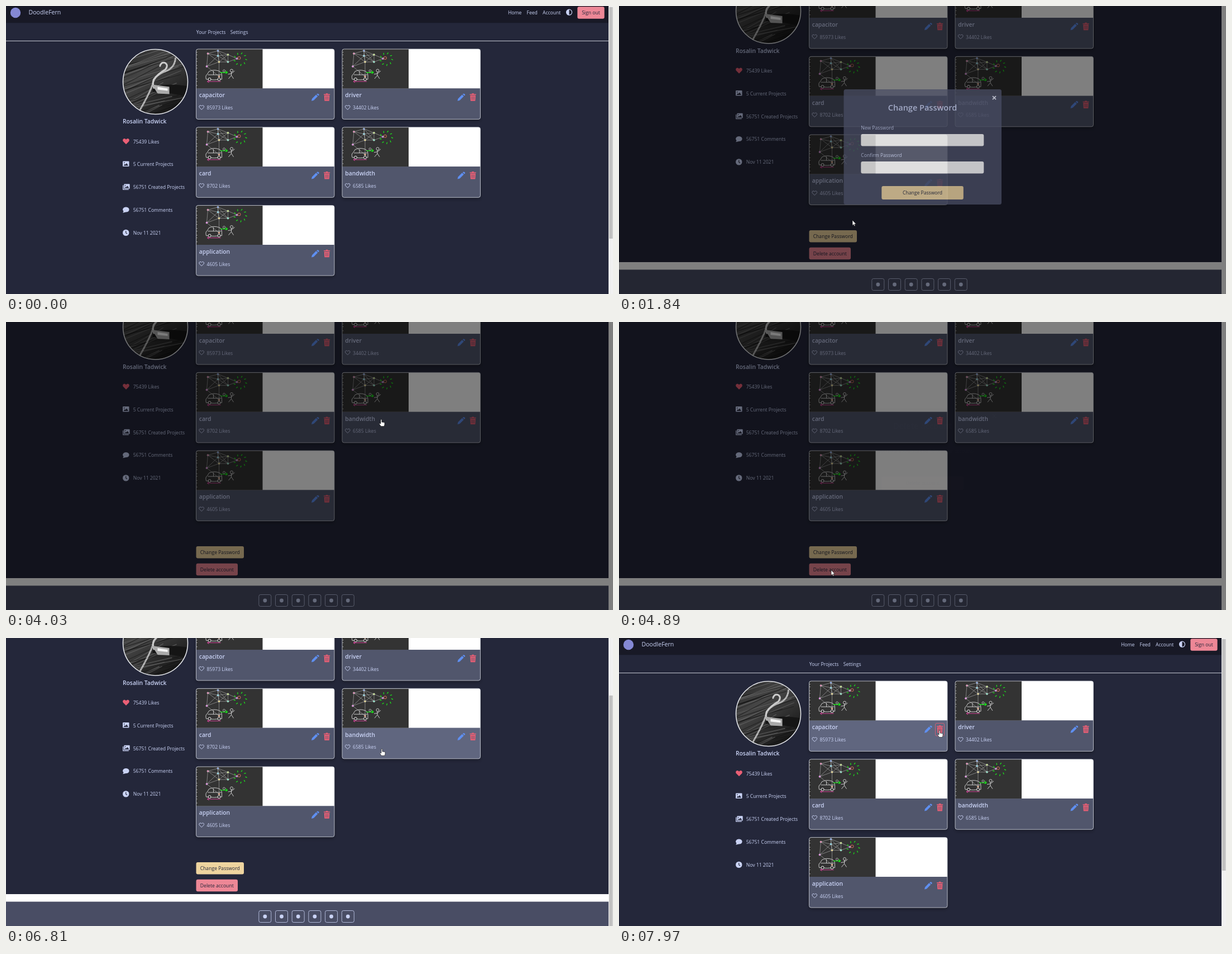
These frames come from a looping animation (1087x515 px, 8000 ms). An HTML page:

```html
<!DOCTYPE html>
<html lang="en">
<head>
<meta charset="utf-8">
<title>Account page</title>
<style>
html, body { margin: 0; width: 100%; height: 100%; overflow: hidden; background: #fff }
svg { display: block }
text { font: 8.6px "Open Sans", "Noto Sans", sans-serif; fill: #cad3f5; white-space: pre }
.bold { font-weight: 600; font-size: 10.3px }
.brand { font-size: 10.6px }
.title { font-weight: 600; font-size: 14.5px }
.mid { text-anchor: middle }
.dark { fill: #24273a }
</style>
</head>
<body>
<svg id="stage" width="1087" height="515" viewBox="0 0 1087 515"></svg>
<script>
const INK = '#cad3f5', RED = '#ed8796', YELLOW = '#eed49f', PANEL = '#494d64', HOT = '#ea5f75';
const BASE = '#24273a', CARD = '#51566c', CARD_HOVER = '#61667f';
const CARD_W = 247.5, CARD_H = 125.5, IMAGE_H = 70.5;
const stage = document.getElementById('stage');

const rect = (x, y, w, h, fill, more = '') =>
  `<rect x="${x}" y="${y}" width="${w}" height="${h}" fill="${fill}" ${more}/>`;
const text = (x, y, s, cls = '') => `<text x="${x}" y="${y}" class="${cls}">${s}</text>`;
const circle = (x, y, r, fill, more = '') => `<circle cx="${x}" cy="${y}" r="${r}" fill="${fill}" ${more}/>`;
const path = (d, fill = 'none', more = '') => `<path d="${d}" fill="${fill}" ${more}/>`;
const line = (d, color, w, more = '') => path(d, 'none', `stroke="${color}" stroke-width="${w}" ${more}`);
const at = (x, y, inner) => `<g transform="translate(${x} ${y})">${inner}</g>`;
const button = (x, y, w, h, fill, label) =>
  rect(x, y, w, h, fill, 'rx="3"') + text(x + w / 2, y + h / 2 + 3.2, label, 'mid dark');
const repeat = (n, f) => Array.from({ length: n }, (_, i) => f(i)).join('');

let seed = 7;
const random = () => (seed = seed * 16807 % 2147483647) / 2147483647;

const HEART = 'M6 10.6 1 5.6C-.8 3.4.6.3 3 .3Q5 .3 6 2 7 .3 9 .3C11.4.3 12.8 3.4 11 5.6Z';
const FRAME = 'M1 0h9.5q1 0 1 1v7.5q0 1-1 1H1q-1 0-1-1V1q0-1 1-1zM1.5 8h8.5L7 3.5 5 6.3 3.8 5zM2 2v1.5h1.5V2z';

// Hand-drawn project picture: a network, a sun, a van and a figure
function sketch() {
  const nodes = [[39, 3], [21, 8], [57, 10], [39, 12], [19, 31], [41, 23], [57, 23], [73, 17], [41, 49]];
  let web = '';
  nodes.forEach((a, i) => nodes.slice(i + 1).forEach(b => {
    if (Math.hypot(a[0] - b[0], a[1] - b[1]) < 30) web += `M${a}L${b}`;
  }));
  const sun = repeat(9, i => `<path d="M9 0l3 1.5" transform="translate(79 18) rotate(${i * 40})" stroke="#1be51b" stroke-width="1.3"/>`);
  return rect(0, 0, 119, 71, '#333') + line(web, '#ccc', .5) +
    line('M1.5 5V68', '#bbb', 1.2, 'stroke-dasharray="1.2 3.5 1.2 6"') +
    nodes.map(([x, y], i) => circle(x, y, 1.5, `hsl(${220 + i * 110} 70% 68%)`, 'stroke="#eee" stroke-width=".5"')).join('') +
    circle(77, 16, 2.5, 'none', 'stroke="#e0705a"') + sun +
    line('M18 54q-2-7 2-9l3-5q8-4 17-1 6 2 6 8v7q-14 2-28 0zM21 46h24M31 39v7', '#eee', .8) +
    circle(24, 54, 2.5, '#333', 'stroke="#eee"') + circle(41, 54, 2.5, '#333', 'stroke="#eee"') +
    line('M44 58H20m3-2-3 2 3 2', '#d6439a', 1) +
    line('M43 42h13m-3-3 3 3-3 2', '#1be51b', 1.3) +
    circle(50, 39, 2, '#333', 'stroke="#ddd" stroke-width=".7"') +
    line('M63 41v6l-5 6m5-6 4 6M57 45l6-1 6-5', '#eee', .8) +
    circle(63.5, 38.5, 2.5, '#333', 'stroke="#eee" stroke-width=".8"');
}

const pencil = path('M0 13.5 1 9.5 8.3 2.2 11.3 5.2 4 12.5ZM9.2 1.3Q11.3-.6 13.2 1.4 14.6 3 12.2 4.3Z', '#5f8ff0');
const trash = path('M0 1.5H3.5L4 .2H7.2L7.7 1.5H11.2V3H0ZM.8 3.8H10.4L9.8 13.7H1.4Z', HOT) +
  line('M3.5 5.5v6.3m2.2-6.3v6.3m2.2-6.3v6.3', CARD, .7);

const cards = [
  ['capacitor', 85973], ['driver', 34402], ['card', 8702], ['bandwidth', 6585], ['application', 4605]
].map(([name, likes], i) => ({ name, likes, x: 340.5 + i % 2 * 261.5, y: 77 + (i >> 1) * 139.8 }));

const drawCard = c => at(c.x, c.y,
  rect(0, 0, CARD_W, CARD_H, CARD, 'rx="3.5" class="body" filter="url(#shadow)"') +
  `<g clip-path="url(#cut)">${rect(0, 0, CARD_W, IMAGE_H, '#fff')}<use href="#sketch"/></g>` +
  rect(0, 0, CARD_W, CARD_H, 'none', 'rx="3.5" stroke="#d5d8e0" stroke-width=".8"') +
  text(5.3, 86.3, c.name, 'bold') +
  at(5.3, 100.5, path(HEART, 'none', `stroke="${INK}" stroke-width="1.3" transform="scale(.74)"`)) +
  text(19, 108, c.likes + ' Likes') +
  at(206.5, 79.3, pencil) + at(228.5, 79, trash));

const photo = at(267.5, 135.5,
  circle(0, 0, 58, 'url(#wood)') + '<g clip-path="url(#round)">' +
  repeat(40, () => line(`M-60 ${random() * 150 - 60}l${60 + random() * 60}-${20 + random() * 25}`,
    random() < .5 ? '#777' : '#111', 1 + random(), 'opacity=".5"')) +
  path('M-5 8Q25 2 60 8V28Q25 18-5 18Z', '#151515') +
  line('M36-43Q35-24 16-18-3-10-5 5-12 24-32 58', '#e2e2e2', 3, 'stroke-dasharray="1.6 .7"') +
  line('M8-27Q10-36 17-34 24-30 18-22 4-14-3-4-6 4-2 12', '#ccc', 3) +
  path('M-6 5 25 9V22L4 21Z', '#aaa') + path('M4 9 22 12V16L4 14Z', '#f5f5f5') +
  '</g>' + circle(0, 0, 58, 'none', 'stroke="#e4e6ea" stroke-width="1.6"'));

const picture = path(FRAME, INK, 'fill-rule="evenodd"');
const stats = [
  ['75439 Likes', path(HEART, HOT)],
  ['5 Current Projects', picture],
  [' 56751 Created Projects'.trim(), at(2.3, 0, `<g transform="scale(.9)">${picture}</g>`) + line('M.7 2.3v7.5h10', INK, 1.3)],
  ['56751 Comments', path('M6 .3C13.5.3 13.5 9.5 6 9.5L.2 10.6 1.5 7.8C-1.5 5 .5.3 6 .3Z', INK)],
  ['Nov 11 2021', circle(5.7, 5.5, 5.7, INK) + line('M5.7 2v3.8l2.3 1.6', BASE, 1.1)]
].map(([label, icon], i) => at(209, 236.7 + i * 40.8, icon + text(18.7, 8.8, label))).join('');

const social = repeat(6, i => at(452.8 + i * 29.7, 614,
  rect(0, 0, 22, 21, 'none', `rx="3" stroke="${INK}" stroke-width=".8"`) + circle(11, 10.5, 3.4, INK)));

const page =
  rect(0, 0, 1079, 584.5, BASE) + rect(0, 0, 1079, 30.3, '#181926') +
  circle(17, 12, 9.2, '#8488d4') + text(40.5, 14.8, 'DoodleFern', 'brand') +
  text(899, 15.3, 'Home') + text(932.5, 15.3, 'Feed') + text(961, 15.3, 'Account') +
  circle(1008.5, 11.2, 5, 'none', `stroke="${INK}" stroke-width="1.2"`) +
  path('M1008.5 6.2a5 5 0 0 0 0 10z', INK) +
  button(1023.3, 1.2, 48.3, 21.5, RED, 'Sign out') +
  text(340.8, 50, 'Your Projects') + text(401.8, 50, 'Settings') +
  rect(0, 62, 1079, 1, '#c4c7d2') +
  photo + text(209, 210.2, 'Rosalin Tadwick', 'bold') + stats +
  cards.map(drawCard).join('') +
  rect(566.5, 152.5, 16, 22.5, 'none', `id="ring" rx="2.5" stroke="${HOT}" stroke-width=".8"`) +
  button(340.5, 527.5, 85.5, 21.5, YELLOW, 'Change Password') +
  button(340.5, 558.3, 74.5, 21.5, RED, 'Delete account') +
  rect(0, 598, 1079, 45, PANEL) + social;

const field = (y, label) => text(433.3, y - 8, label) + rect(433.3, y, 220, 21.5, '#fff', 'rx="3"');

// Dialogs are centred on y = 259, with the action button at the foot
const dialog = (id, h, title, color, action, inner) => `<g id="${id}">` + at(402.5, 259 - h / 2,
  rect(0, 0, 282.5, h, PANEL, 'rx="3.5"') +
  line('M266.5 12l6 6m0-6-6 6', '#e8ebf8', 1.7) +
  text(141, 38.3, title, 'title mid') +
  button(67.8, h - 33, 146.5, 24, color, action)) + inner + '</g>';

stage.innerHTML = `<defs>
  <filter id="shadow" x="-5%" y="-5%" width="110%" height="120%"><feDropShadow dx="0" dy="3" stdDeviation="3" flood-opacity=".3"/></filter>
  <clipPath id="cut"><path d="M0 ${IMAGE_H}V3.5Q0 0 3.5 0H244Q247.5 0 247.5 3.5V${IMAGE_H}z"/></clipPath>
  <clipPath id="round"><circle r="58"/></clipPath>
  <linearGradient id="wood" x2=".7" y2="1"><stop stop-color="#222"/><stop offset=".4" stop-color="#474747"/><stop offset="1" stop-color="#161616"/></linearGradient>
  <g id="sketch">${sketch()}</g></defs>
  <g id="page">${page}</g>
  <g id="bar">${rect(1079, 0, 8, 515, '#f1f1f1')}${rect(1080, 2, 6.5, 414, '#c1c1c1', 'id="thumb"')}</g>
  ${rect(0, 0, 1087, 515, '#000', 'id="shade"')}` +
  dialog('change', 206, 'Change Password', YELLOW, 'Change Password',
    field(236, 'New Password') + field(284.8, 'Confirm Password')) +
  dialog('remove', 156, 'Delete account', RED, 'Delete account',
    text(543.5, 262, 'Are you sure you want to delete your account?', 'mid')) +
  `<g id="cursor" stroke="#111" stroke-width=".6" fill="#fff">
  <path id="arrow" d="M0 0V9.5L2.1 7.6 3.5 10.7 5 10 3.6 7H6.5Z"/>
  <path id="hand" d="M-1 .8Q0-.8 1 .8V5L4.8 5.5Q6 5.5 6 6.5V9.5L5 12.5H-.5L-3.5 8.3Q-3.5 6.5-1 8Z"/></g>`;

const $ = id => document.getElementById(id);
const bodies = document.querySelectorAll('.body');
const show = (id, on) => $(id).setAttribute('visibility', on ? 'visible' : 'hidden');
const move = (id, x, y) => $(id).setAttribute('transform', `translate(${x} ${y})`);
const ramp = (t, start, length) => Math.min(1, Math.max(0, (t - start) / length));
const easeOut = p => 1 - (1 - p) ** 2;
const smooth = p => p * p * (3 - 2 * p);

// Pointer moves: start, duration, destination
const moves = [
  [20, 30, 898, 452], [190, 80, 868, 434], [560, 140, 848, 424], [1060, 340, 388, 410],
  [1700, 500, 450, 270], [2200, 420, 468, 264], [2640, 370, 595, 270], [3050, 780, 672, 174],
  [4080, 520, 380, 443.5], [5060, 420, 466, 330], [5520, 850, 673, 198], [6830, 320, 697, 270],
  [7300, 550, 574, 165]
];

// x leads y, which bends each move slightly
function pointer(t) {
  let x = 1025, y = 505;
  for (const [start, length, toX, toY] of moves) {
    const p = ramp(t, start, length);
    x += (toX - x) * easeOut(p);
    y += (toY - y) * smooth(p);
  }
  return [x, y];
}

// The backdrop comes before its dialog and leaves after it
const LAG = 190;
const visits = [{ id: 'change', open: 1500, close: 3850 }, { id: 'remove', open: 4700, close: 6400 }];

function draw() {
  const t = performance.now() % 8000;
  const scroll = 126.5 * (easeOut(ramp(t, 660, 400)) - easeOut(ramp(t, 6840, 280)));
  move('page', 0, -scroll);
  move('thumb', 0, scroll * .797);

  let shade = 0, hand = false;
  const [x, screenY] = pointer(t), y = screenY + scroll;
  for (const { id, open, close } of visits) {
    shade += ramp(t, open, 150) - ramp(t, close + LAG, 150);
    const p = easeOut(ramp(t, open + LAG, 300)) * (1 - ramp(t, close, 150));
    $(id).setAttribute('opacity', p);
    move(id, 0, -28 * (1 - p));
    hand ||= t > close - 70 && t < close + 2 * LAG;
  }
  $('shade').setAttribute('opacity', shade / 2);

  const free = shade < .001;
  const over = (l, top, w, h) => free && x > l && x < l + w && y > top && y < top + h;
  hand ||= over(340.5, 527.5, 85.5, 21.5) || over(340.5, 558.3, 74.5, 21.5);
  cards.forEach((c, i) => {
    hand ||= over(c.x, c.y, CARD_W, CARD_H);
    const lit = over(c.x, c.y + IMAGE_H, CARD_W, CARD_H - IMAGE_H);
    bodies[i].setAttribute('fill', lit ? CARD_HOVER : CARD);
  });
  show('bar', free);
  show('ring', over(566.5, 152.5, 16, 22.5));
  move('cursor', x, screenY);
  show('hand', t > 20 && hand);
  show('arrow', t > 20 && !hand);
  requestAnimationFrame(draw);
}
draw();
</script>
</body>
</html>
```
